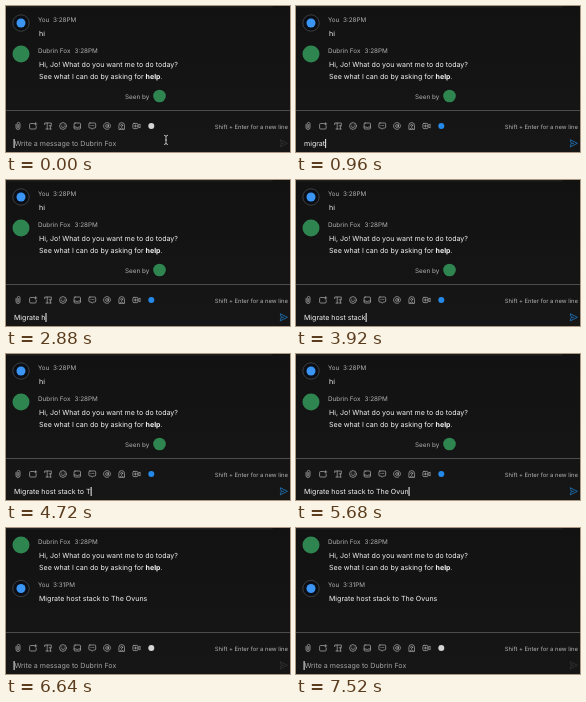
These frames come from a looping animation (284 by 146 pixels, 8 s). An HTML page:

```html
<!DOCTYPE html>
<html lang="en">
<head>
<meta charset="utf-8">
<title>Chat</title>
<style>
  html, body { margin: 0; width: 100%; height: 100%; overflow: hidden; background: #141414; }
  svg { display: block; width: 100%; height: 100%; }
  text { font-family: Inter, Roboto, sans-serif; font-size: 7.06px; fill: #f4f4f4; white-space: pre; text-rendering: geometricPrecision; }
  .meta { font-size: 6.35px; fill: #b2b2b2; }
  .hint { font-size: 5.88px; fill: #b4b4b4; }
  .icons { fill: none; stroke: #a6a6a6; stroke-width: .75; stroke-linecap: round; stroke-linejoin: round; }
  #placeholder { fill: #a4a4a4; }
</style>
</head>
<body>
<svg viewBox="0 0 284 146">
  <defs>
    <linearGradient id="shade" x1="0" y1="0" x2="0" y2="1">
      <stop offset="0" stop-color="#121212"/>
      <stop offset="1" stop-color="#161616"/>
    </linearGradient>
    <clipPath id="pane"><rect y="2" width="284" height="102"/></clipPath>
    <g id="me">
      <circle r="8.2" fill="#0b0f15" stroke="#4a4a4a" stroke-width=".8"/>
      <circle r="4.5" fill="#3a95f5"/>
    </g>
    <circle id="bot" r="8.5" fill="#2f8550"/>
  </defs>

  <rect width="284" height="146" fill="url(#shade)"/>
  <rect x="-4" y="-2" width="271" height="3.5" rx="2" fill="#1f1f1f"/>

  <g clip-path="url(#pane)">
    <g id="chat">
      <use href="#me" x="15" y="17"/>
      <text class="meta" x="32" y="16.3">You</text>
      <text class="meta" x="47" y="16.3">3:28PM</text>
      <text x="33" y="29.6">hi</text>

      <use href="#bot" x="15" y="48"/>
      <text class="meta" x="32" y="46.9">Dubrin Fox</text>
      <text class="meta" x="68.5" y="46.9">3:28PM</text>
      <text x="33" y="61">Hi, Jo! What do you want me to do today?</text>
      <text x="33" y="73">See what I can do by asking for <tspan font-weight="700">help</tspan>.</text>

      <g id="seen">
        <text class="meta" x="119" y="92.8">Seen by</text>
        <circle cx="153.5" cy="90" r="6.3" fill="#2f8550"/>
      </g>
      <g id="sent">
        <use href="#me" x="15" y="91.5"/>
        <text class="meta" x="32" y="89.9">You</text>
        <text class="meta" x="47" y="89.9">3:31PM</text>
        <text x="33" y="103.9">Migrate host stack to The Ovuns</text>
      </g>
    </g>
  </g>

  <path d="M0 104.5H284" stroke="#4c4c4c"/>

  <g class="icons">
    <path transform="translate(12 120)" d="M-2 -1.5V1.5a2 2 0 0 0 4 0V-2.2a1.4 1.4 0 0 0 -2.8 0V1.4a.7 .7 0 0 0 1.5 0V-1.5"/>
    <path transform="translate(27 120)" d="M1 -2.5H-2.4a1 1 0 0 0 -1 1V2a1 1 0 0 0 1 1H2.2a1 1 0 0 0 1 -1V0M2.6 -3.3V-1M1.4 -2.1H3.8"/>
    <path transform="translate(42 120)" d="M-3.3 -1.4V-3H3.3V-1.4M-.8 -3V3M-2 3H.4M1.2 -.2H3.6M2.4 -.2V3M1.6 3H3.2"/>
    <g transform="translate(57 120)">
      <circle r="3.4"/>
      <path d="M-1.6 .8Q0 2.6 1.6 .8M-1.2 -1V-.9M1.2 -1V-.9"/>
    </g>
    <g transform="translate(71.3 120)">
      <rect x="-3.2" y="-3" width="6.4" height="6" rx="1"/>
      <path d="M-3.2 1H-1.4Q0 2.4 1.4 1H3.2"/>
    </g>
    <path transform="translate(86.3 120)" d="M-2.4 -3H2.4a1 1 0 0 1 1 1V1a1 1 0 0 1 -1 1H1L0 3.3L-1 2H-2.4a1 1 0 0 1 -1 -1V-2a1 1 0 0 1 1 -1ZM-1.4 -.5V-.4M0 -.5V-.4M1.4 -.5V-.4"/>
    <g transform="translate(101 120)">
      <circle r="1.4"/>
      <path d="M1.4 -1.4V.6a1 1 0 0 0 2 0V0A3.4 3.4 0 1 0 1.8 2.9"/>
    </g>
    <g transform="translate(115.7 120)">
      <path d="M-2.8 3V-.6a2.8 2.8 0 0 1 5.6 0V3Z"/>
      <circle cy="-.6" r="1"/>
      <path d="M-1.6 2.8Q0 .4 1.6 2.8"/>
    </g>
    <g transform="translate(130.5 120)">
      <rect x="-3.6" y="-2.6" width="5" height="5.2" rx="1"/>
      <path d="M1.4 -.6L3.6 -1.9V1.9L1.4 .6M-2.2 0H0M-1.1 -1.1V1.1"/>
    </g>
  </g>
  <circle id="app" cx="145.3" cy="120" r="3"/>
  <text class="hint" x="282" y="122.7" text-anchor="end">Shift + Enter for a new line</text>

  <text id="placeholder" x="8.4" y="139.9">Write a message to Dubrin Fox</text>
  <text id="typed" x="8" y="139.9"></text>
  <rect id="caret" y="133" width="1" height="9" fill="#f2f2f2"/>
  <path id="send" d="M274.2 133.7L281.4 137.3L274.2 140.9L275.3 137.3ZM275.3 137.3H278" fill="none" stroke-width=".8" stroke-linejoin="round"/>
  <path id="mouse" d="M158 129.3Q160 129.3 160 130.8Q160 129.3 162 129.3M160 130.8V137M158 138.5Q160 138.5 160 137Q160 138.5 162 138.5M159 134H161" fill="none" stroke="#d8d8d8" stroke-width=".8"/>
</svg>

<script>
  const LOOP = 8000, CLEAR = 1520, SUBMIT = 6240, POST = 6480, SCROLL = -31;
  const el = id => document.getElementById(id);
  const [chat, seen, sent, app, placeholder, typed, caret, send, mouse] =
    ["chat", "seen", "sent", "app", "placeholder", "typed", "caret", "send", "mouse"].map(el);

  // One key time per character.
  const drafts = [
    { text: "migrate ", until: CLEAR, keys: [320, 480, 640, 800, 960, 960, 1040, 1200] },
    { text: "Migrate host stack to The Ovuns", until: SUBMIT, keys: [
      2080, 2160, 2240, 2320, 2400, 2560, 2640, 2880,
      2880, 2960, 3040, 3200, 3280,
      3440, 3600, 3680, 3840, 3920, 4080,
      4160, 4320, 4400,
      4640, 4880, 5040, 5120,
      5360, 5440, 5600, 5680, 5840] }
  ];

  const ramp = (t, from, to) => Math.min(1, Math.max(0, (t - from) / (to - from)));
  const show = (node, on) => node.setAttribute("visibility", on ? "visible" : "hidden");

  function draftAt(t) {
    const draft = drafts.find(d => t < d.until);
    return draft ? draft.text.slice(0, draft.keys.filter(k => k <= t).length) : "";
  }

  function draw(t) {
    const draft = draftAt(t), posted = t >= POST;
    if (typed.textContent !== draft) typed.textContent = draft;
    show(placeholder, !draft);
    show(mouse, t < drafts[0].keys[0]);
    show(seen, !posted);
    show(sent, posted);
    chat.setAttribute("transform", `translate(0 ${posted ? SCROLL : 0})`);

    app.setAttribute("fill", draft ? "#2489e8" : "#d4d4d4");
    send.setAttribute("stroke", draft ? "#1f78c0" : "#333");
    caret.setAttribute("x", draft ? 8 + typed.getComputedTextLength() : 7.6);
    caret.setAttribute("opacity", 1 - ramp(t, 6880, 7120) + ramp(t, 7280, 7520));
  }

  const start = performance.now();
  function tick() {
    draw((performance.now() - start) % LOOP);
    requestAnimationFrame(tick);
  }
  tick();
</script>
</body>
</html>
```
